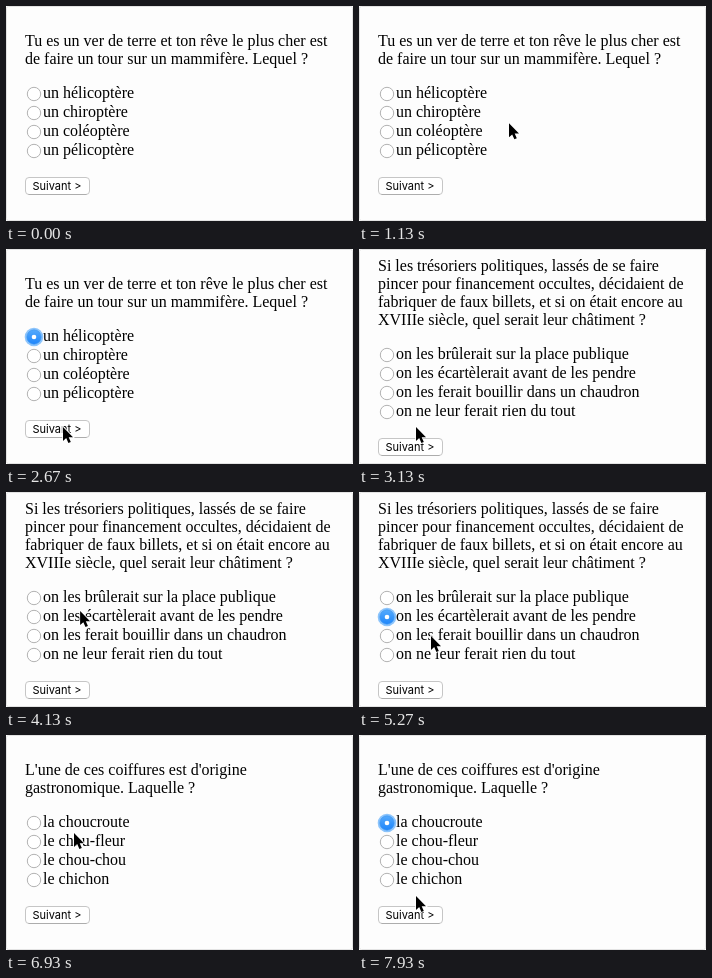
Recreate the animation shown at these times as an HTML page. Size 347x215 px, loop 8 s.

```html
<!DOCTYPE html>
<html lang="fr">
<head>
<meta charset="utf-8">
<title>Quiz</title>
<style>
  html, body { margin: 0; width: 100%; height: 100%; overflow: hidden; background: #fff; }
  svg { display: block; }
  text { white-space: pre; }
  .serif { font: 16px "Liberation Serif", Times, serif; }
  .label { font: 11px Inter, "Liberation Sans", sans-serif; }
</style>
</head>
<body>
<svg id="stage" width="347" height="215" viewBox="0 0 347 215">
  <defs>
    <linearGradient id="blue" x1="0" y1="0" x2="0" y2="1">
      <stop offset="0" stop-color="#55aafc"/><stop offset="1" stop-color="#1f86fb"/>
    </linearGradient>
  </defs>
  <rect x=".5" y=".5" width="346" height="214" rx="2" fill="#fdfdfd" stroke="#e3e3e3"/>
  <g id="page"></g>
  <path id="cursor" d="M0 0V14L3.2 11.1L5.4 16L7.8 15L5.7 10.2H10Z" stroke="#fff" stroke-width="1.6" paint-order="stroke"/>
</svg>
<script>
const LOOP = 8000, TICKS = 120;

// All times below are in ticks of 1/15 s.
const quiz = [
  { start: 0, top: 40, press: 26, check: 28, submit: 44, answer: 0,
    lines: ["Tu es un ver de terre et ton rêve le plus cher est",
            "de faire un tour sur un mammifère. Lequel ?"],
    options: ["un hélicoptère", "un chiroptère", "un coléoptère", "un pélicoptère"] },
  { start: 46, top: 22, press: 73, check: 75, submit: 89, answer: 1,
    lines: ["Si les trésoriers politiques, lassés de se faire",
            "pincer pour financement occultes, décidaient de",
            "fabriquer de faux billets, et si on était encore au",
            "XVIIIe siècle, quel serait leur châtiment ?"],
    options: ["on les brûlerait sur la place publique",
              "on les écartèlerait avant de les pendre",
              "on les ferait bouillir dans un chaudron",
              "on ne leur ferait rien du tout"] },
  { start: 91, top: 40, press: 111, check: 113, submit: 999, answer: 0,
    lines: ["L'une de ces coiffures est d'origine",
            "gastronomique. Laquelle ?"],
    options: ["la choucroute", "le chou-fleur", "le chou-chou", "le chichon"] }
];

// Pointer waypoints: tick, x, y
const path = [
  [14, 275, 190], [15, 234, 167], [18, 123, 102], [22, 84, 83], [28, 84, 83],
  [40, 57, 178], [48, 57, 178], [56, 58, 184], [64, 77, 107], [68, 77, 107],
  [71, 75, 126], [78, 75, 126], [79, 72, 144], [86, 55, 198], [97, 55, 198],
  [104, 68, 98], [110, 79, 83], [112, 79, 83], [119, 57, 161], [120, 57, 168]
];

const page = document.getElementById("page");
const cursor = document.getElementById("cursor");

const slope = (i, axis) => (path[i + 1][axis] - path[i][axis]) / (path[i + 1][0] - path[i][0]);

// Monotone tangent: flat at rests and turning points.
function tangent(i, axis) {
  if (i === 0) return slope(0, axis);
  if (i === path.length - 1) return slope(i - 1, axis);
  const a = slope(i - 1, axis), b = slope(i, axis);
  return a * b > 0 ? 2 * a * b / (a + b) : 0;
}

function along(tick, axis) {
  let i = 0;
  while (i < path.length - 2 && path[i + 1][0] <= tick) i++;
  const span = path[i + 1][0] - path[i][0];
  const u = (tick - path[i][0]) / span, v = 1 - u;
  return path[i][axis] * v * v * (1 + 2 * u) + path[i + 1][axis] * u * u * (3 - 2 * u)
    + span * u * v * (tangent(i, axis) * v - tangent(i + 1, axis) * u);
}

const text = (x, y, content, style = "serif", fill = "#000") =>
  `<text class="${style}" x="${x}" y="${y}" fill="${fill}">${content.replace(/>/g, "&gt;")}</text>`;

const disc = (y, r, attrs) => `<circle cx="28" cy="${y}" r="${r}" ${attrs}/>`;

function radio(y, state, focused) {
  if (state === "checked") {
    return (focused ? disc(y, 9.3, 'fill="#8cc4fb"') : "")
      + disc(y, 7.2, 'fill="url(#blue)" stroke="#3a94f2" stroke-width=".6"')
      + disc(y, 2.3, 'fill="#fff"');
  }
  const fill = state === "pressed" ? "#e2e2e2" : "#fff";
  return disc(y, 6.7, `fill="${fill}" stroke="#b2b2b2"`);
}

function button(y, pressed) {
  const paint = pressed ? 'fill="url(#blue)" stroke="#2c86ea"' : 'fill="#fff" stroke="#c6c6c6"';
  return `<rect x="19.5" y="${y + .5}" width="64" height="17" rx="3.5" ${paint}/>`
    + (pressed ? "" : `<path d="M22.5 ${y + 17.5}H80.5" stroke="#adadad"/>`)
    + text(26.5, y + 13, "Suivant >", "label", pressed ? "#fff" : "#000");
}

function drawPage(q, tick) {
  const first = q.top + 18 * q.lines.length + 16;
  const state = tick >= q.check ? "checked" : tick >= q.press ? "pressed" : "off";
  const submitting = tick >= q.submit;
  return q.lines.map((line, i) => text(19, q.top + 18 * i, line)).join("")
    + q.options.map((option, i) => {
        const y = first + 19 * i;
        return radio(y - 4, i === q.answer ? state : "off", !submitting) + text(37, y, option);
      }).join("")
    + button(first + 79, submitting);
}

let shown = -1;
function render(ms) {
  const tick = Math.floor((ms % LOOP) * TICKS / LOOP + 0.06) % TICKS;
  if (tick === shown) return;
  shown = tick;
  page.innerHTML = drawPage(quiz.filter(q => q.start <= tick).pop(), tick);
  cursor.setAttribute("visibility", tick < 15 ? "hidden" : "visible");
  cursor.setAttribute("transform", `translate(${along(tick, 1)} ${along(tick, 2)})`);
}

const begin = performance.now();
function frame() {
  render(performance.now() - begin);
  requestAnimationFrame(frame);
}
frame();
</script>
</body>
</html>
```
